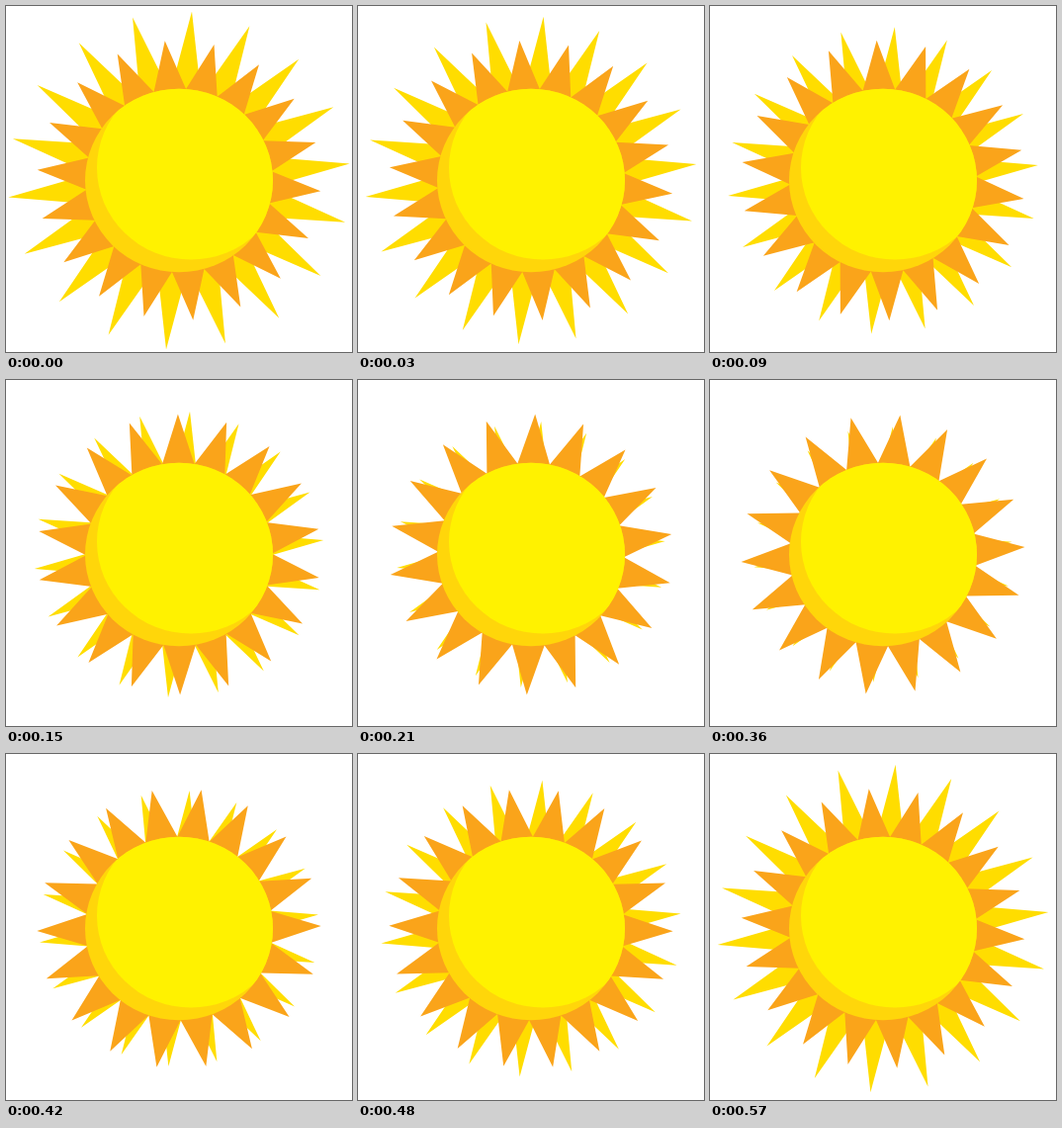
An HTML page with a canvas that plays this animation: 350x350 px, repeating every 0.6 s.

```html
<!DOCTYPE html>
<html lang="en">
<head>
<meta charset="utf-8">
<title>Spinning sun</title>
<style>
  html, body { margin: 0; width: 100%; height: 100%; overflow: hidden; background: #fff; }
  canvas { display: block; }
</style>
</head>
<body>
<canvas id="stage" width="350" height="350"></canvas>
<script>
const ctx = document.getElementById('stage').getContext('2d');
const STEP_MS = 30, STEPS = 20, RAYS = 18;
const RAD = Math.PI / 180;

// Star with its first tip at `angle` degrees clockwise from the top.
function star(angle, tip, valley, color) {
  ctx.beginPath();
  for (let i = 0; i < RAYS * 2; i++) {
    const a = (angle + i * 180 / RAYS) * RAD;
    const r = i % 2 ? valley : tip;
    ctx.lineTo(r * Math.sin(a), -r * Math.cos(a));
  }
  ctx.fillStyle = color;
  ctx.fill();
}

function disc(x, y, color) {
  ctx.beginPath();
  ctx.ellipse(x, y, 95, 94, 0, 0, Math.PI * 2);
  ctx.fillStyle = color;
  ctx.fill();
}

function draw(step) {
  ctx.fillStyle = '#fff';
  ctx.fillRect(0, 0, 350, 350);
  ctx.save();
  ctx.translate(175, 176.5);
  ctx.scale(1, 0.988);

  // The back rays shrink and grow; the front rays turn by one ray per loop.
  const reach = 120.5 + 5.3 * Math.abs(step - STEPS / 2);
  star(4.3, reach, reach * 0.52, '#ffdd00');
  star(-5.7 + step * 20 / (STEPS - 1), 143.7, 94, '#faa41a');

  disc(0, 0, '#ffd60a');
  ctx.clip();
  disc(12, -13, '#fff200');
  ctx.restore();
}

const start = performance.now();
function tick() {
  draw(Math.floor((performance.now() - start) / STEP_MS) % STEPS);
  requestAnimationFrame(tick);
}
tick();
</script>
</body>
</html>
```
